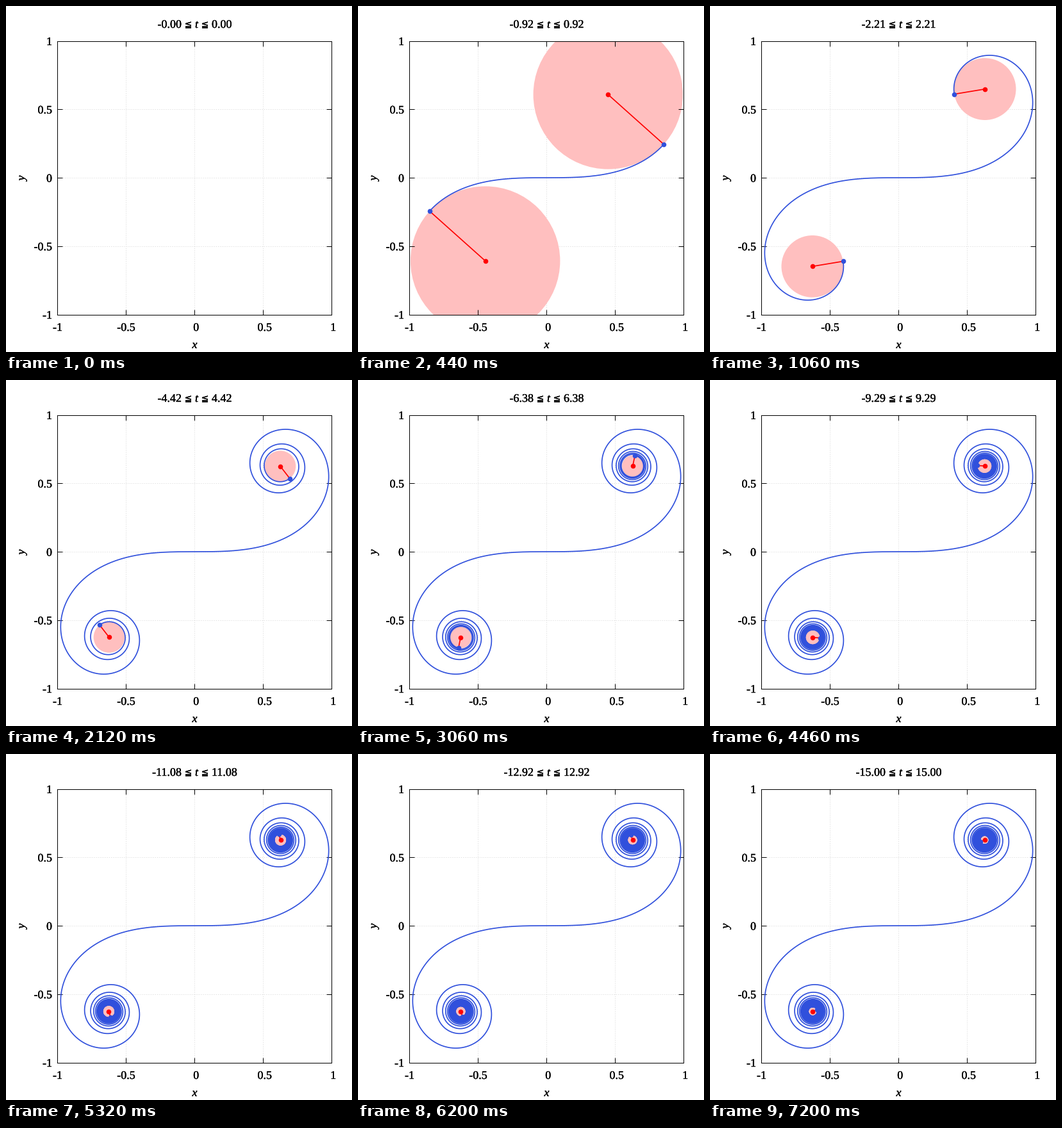
Recreate the animation shown at these times as a matplotlib script. Size 540 by 540 pixels, loop 7220 ms.

```python
import numpy as np
import matplotlib.pyplot as plt
from matplotlib.animation import FuncAnimation
from matplotlib.patches import Circle
from matplotlib.patheffects import withStroke

SIZE = 540
FRAMES = 361
T_MAX = 15
# Just off the half pixel, so that border and ticks snap to stable pixels
LEFT, TOP, W, H = 80.49, 54.51, 428, 427
MID = LEFT + W / 2
BLUE, RED, PINK = "#3050dc", "#ff0000", "#ffbfbf"
FONT = 18
plt.rcParams["text.hinting"] = "none"

# Curve: x = int cos(s^2) ds, y = int sin(s^2) ds, by the midpoint rule
SUB = 10                          # integration steps per kept point
PER_FRAME = 10                    # kept points per animation step
COUNT = (FRAMES - 1) * PER_FRAME
h = T_MAX / (COUNT * SUB)
s = (np.arange(COUNT * SUB) + 0.5) * h
steps = np.column_stack([np.cos(s**2), np.sin(s**2)]) * h
curve = np.vstack([[0, 0], np.cumsum(steps, axis=0)])[::SUB]

fig = plt.figure(figsize=(SIZE / 72, SIZE / 72), dpi=72, facecolor="white")
ax = fig.add_axes([LEFT / SIZE, 1 - (TOP + H) / SIZE, W / SIZE, H / SIZE])
ax.set(xlim=(-1, 1), ylim=(-1, 1))
ticks = np.linspace(-1, 1, 5)
ax.set_xticks(ticks)
ax.set_yticks(ticks)
ax.tick_params(direction="in", length=8, width=1, top=True, right=True,
               labelbottom=False, labelleft=False)
for spine in ax.spines.values():
    spine.set_linewidth(1)


def label(x, y, text, ha="center", family="Liberation Serif", size=FONT, **kw):
    """Slightly heavy text with its baseline at stage pixel (x, y), y down."""
    return fig.text(x / SIZE, 1 - y / SIZE, text, ha=ha, va="baseline",
                    family=family, size=size,
                    path_effects=[withStroke(linewidth=0.35, foreground="black")],
                    **kw)


for v in ticks:
    part = (v + 1) / 2
    shift = 2.25 if v >= 0 else 0
    label(LEFT + part * W + shift, 507, f"{v:g}")
    label(72, TOP + (1 - part) * H + 6.5, f"{v:g}", ha="right")

for v in ticks[1:-1]:
    dots = dict(color="#c4c4c4", lw=0.8, dashes=(1, 2.6), zorder=0.5)
    ax.axvline(v, **dots)
    ax.axhline(v, **dots)

label(MID, 534, "x", style="italic")
label(29, TOP + H / 2 + 0.5, "y", style="italic", rotation=90, rotation_mode="anchor")

# Title is built outward from the italic t
T_X = MID + 3
label(T_X, 34, "t", style="italic")
for side in (-1, 1):
    label(T_X + 13 * side, 33.5, "\u2266", family="DejaVu Sans", size=14)
low = label(T_X - 23.5, 34, "", ha="right")
high = label(T_X + 23.5, 34, "", ha="left")

discs = [ax.add_patch(Circle((0, 0), 1, fc=PINK, lw=0, zorder=1)) for _ in range(2)]
path, = ax.plot([], [], color=BLUE, lw=1.7, zorder=2, solid_joinstyle="round")
arms = [ax.plot([], [], color=RED, lw=1.7, zorder=3)[0] for _ in range(2)]
tips, = ax.plot([], [], "o", color=BLUE, ms=7.6, mew=0, zorder=4)
hubs, = ax.plot([], [], "o", color=RED, ms=7.6, mew=0, zorder=5)
for marks in (tips, hubs):
    marks.set_snap(False)
moving = [*discs, path, *arms, tips, hubs]


def update(i):
    t = i * T_MAX / (FRAMES - 1)
    low.set_text(f"{-t:.2f}")
    high.set_text(f"{t:.2f}")
    for artist in moving:
        artist.set_visible(i > 0)
    if i > 0:
        half = curve[:i * PER_FRAME + 1]
        path.set_data(*np.vstack([-half[:0:-1], half]).T)
        radius = 1 / (2 * t)
        tip = half[-1]
        hub = tip + radius * np.array([-np.sin(t * t), np.cos(t * t)])
        for sign, disc, arm in zip((1, -1), discs, arms):
            disc.set_center(sign * hub)
            disc.set_radius(radius)
            arm.set_data(*(sign * np.array([tip, hub])).T)
        tips.set_data(*np.array([tip, -tip]).T)
        hubs.set_data(*np.array([hub, -hub]).T)
    return [*moving, low, high]


anim = FuncAnimation(fig, update, frames=FRAMES, interval=20,
                     repeat=True, repeat_delay=0, blit=False)
plt.show()
```
